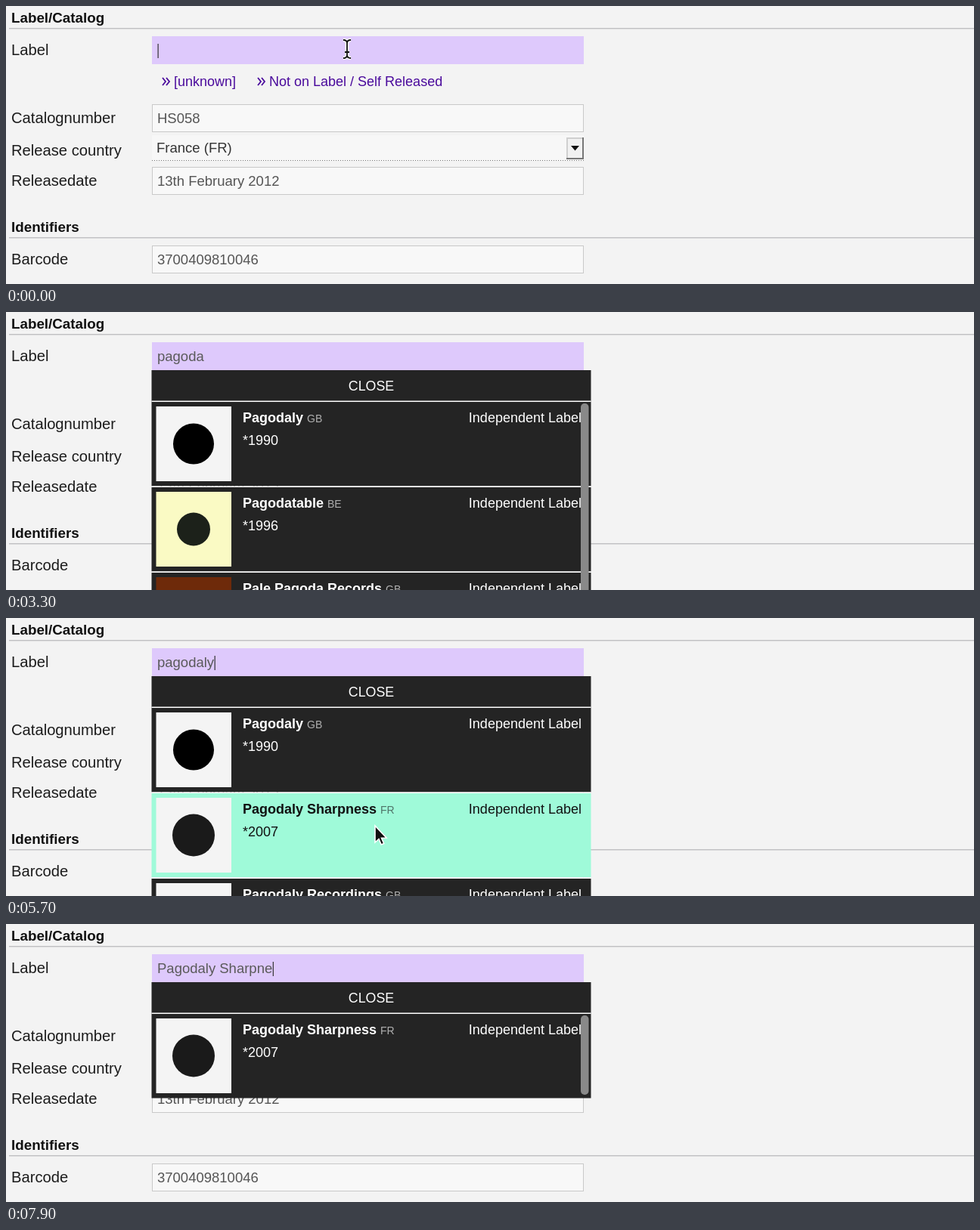
An HTML page with a canvas for the animation above (8000 ms loop, 1280x368 px).

```html
<!DOCTYPE html>
<html lang="en">
<head>
<meta charset="utf-8">
<title>Label search form</title>
<style>
  html, body { margin: 0; width: 100%; height: 100%; overflow: hidden; background: #f3f3f3; }
  canvas { display: block; }
</style>
</head>
<body>
<canvas id="stage" width="1280" height="368"></canvas>
<script>
const ctx = document.getElementById('stage').getContext('2d');
const LOOP = 8000;
const PURPLE = '#4a0a9c';
const FAMILY = '"Liberation Sans", Arial, sans-serif';
const PANEL = { x: 192.5, y: 77, width: 581, rowTop: 119, rowStep: 113, rowHeight: 111.5 };

const ROWS = {
  damp:   { name: 'Damp Pages', code: 'GB', tile: '#000', mark: '#fff', size: 20 },
  plain:  { name: 'Pagodaly', code: 'GB', year: '*1990', tile: '#f4f4f4', mark: '#000', size: 27 },
  tunic:  { name: 'Page Tunic', code: 'US', tile: '#000' },
  table:  { name: 'Pagodatable', code: 'BE', year: '*1996', tile: '#fafac4', mark: '#1c211a', size: 22 },
  pale:   { name: 'Pale Pagoda Records', code: 'GB', tile: '#6e2a0a' },
  sharp:  { name: 'Pagodaly Sharpness', code: 'FR', year: '*2007', tile: '#f4f4f4', mark: '#1a1a1a', size: 28 },
  record: { name: 'Pagodaly Recordings', code: 'GB', tile: '#f4f4f4' }
};

// Each list holds [start time, value]; the latest started entry applies.
const TYPED = [
  [0, ''], [800, 'p'], [1000, 'pa'], [1300, 'pag'], [1900, 'pago'], [2200, 'pagod'],
  [2700, 'pagoda'], [3500, 'pagodal'], [3650, 'pagodaly'], [5850, 'Pagodaly Sharpness'],
  [7300, 'Pagodaly Sharpnes'], [7500, 'Pagodaly Sharpne']
];
const FOCUS = [[0, true], [5850, false], [6800, true]];
const RESULTS = [
  [0, null],
  [1600, ['damp', 'plain', 'tunic']],
  [3000, ['plain', 'table', 'pale']],
  [4100, ['plain', 'sharp', 'record']],
  [5850, null],
  [7700, ['sharp']]
];
const SCROLLBAR_TIME = 700;
const POINTER = [
  [0, 451, 57], [4500, 451, 57], [4900, 460, 150], [5200, 480, 224], [5500, 488, 275],
  [5850, 488, 275], [6300, 440, 106], [6600, 425, 60], [8000, 425, 60]
];
const pointerHidden = t => (t >= 700 && t < 4500) || t >= 7250;

const current = (list, t) => list.filter(entry => entry[0] <= t).pop();

function pointerAt(t) {
  const i = POINTER.findIndex(p => p[0] > t);
  const [t0, x0, y0] = POINTER[i - 1];
  const [t1, x1, y1] = POINTER[i];
  const u = (t - t0) / (t1 - t0);
  return { x: x0 + (x1 - x0) * u, y: y0 + (y1 - y0) * u };
}

function rect(x, y, w, h, color) {
  ctx.fillStyle = color;
  ctx.fillRect(x, y, w, h);
}

function text(str, x, y, size, color, weight = 'normal', align = 'left') {
  ctx.font = `${weight} ${size}px ${FAMILY}`;
  ctx.fillStyle = color;
  ctx.textAlign = align;
  ctx.fillText(str, x, y);
  return ctx.measureText(str).width;
}

function polyline(points, close) {
  ctx.beginPath();
  points.forEach(([x, y]) => ctx.lineTo(x, y));
  if (close) ctx.closePath();
}

function heading(str, y) {
  text(str, 7, y, 18.8, '#111', 'bold');
  rect(4, y + 7.2, 1276, 1.2, '#b6b6b9');
}

function inputBox(y, h) {
  rect(193, y, 571, h, '#f8f8f8');
  ctx.strokeStyle = '#c9c9c9';
  ctx.lineWidth = 1;
  ctx.strokeRect(193.5, y + 0.5, 570, h - 1);
}

function link(str, x) {
  ctx.strokeStyle = PURPLE;
  ctx.lineWidth = 1.8;
  for (const dx of [1, 6]) {
    polyline([[x + dx, 95], [x + dx + 4, 100], [x + dx, 105]]);
    ctx.stroke();
  }
  text(str, x + 16, 106, 18, PURPLE);
}

function countrySelect() {
  rect(193, 171, 571, 33, '#f7f7f7');
  text('France (FR)', 199, 193.5, 18.5, '#333');
  ctx.strokeStyle = '#777';
  ctx.lineWidth = 1;
  ctx.setLineDash([1, 2]);
  polyline([[193, 204.5], [764, 204.5]]);
  ctx.stroke();
  ctx.setLineDash([]);
  rect(741, 174, 23, 29, '#777');
  rect(741, 174, 21, 27, '#cfcfcf');
  rect(743, 176, 19, 25, '#f1f1f1');
  polyline([[747, 185], [758, 185], [752.5, 191.5]], true);
  ctx.fillStyle = '#111';
  ctx.fill();
}

function labelField(t) {
  const [typedAt, value] = current(TYPED, t);
  const [focusAt, focused] = current(FOCUS, t);
  if (focused) rect(193, 40, 571, 37, '#dec9fc');
  else inputBox(40, 37);
  const width = text(value, 200, 65, 18.5, '#5a5a5a');
  const sinceEdit = t - Math.max(typedAt, focusAt);
  if (focused && sinceEdit % 1000 < 500) rect(200.5 + width, 50, 1.2, 19, '#333');
}

function form(t) {
  rect(0, 0, 1280, 368, '#f3f3f3');
  heading('Label/Catalog', 22);
  heading('Identifiers', 299);
  [['Label', 65], ['Catalognumber', 155], ['Release country', 198],
   ['Releasedate', 238], ['Barcode', 342]].forEach(([str, y]) => text(str, 7, y, 20.2, '#1c1c1c'));
  labelField(t);
  link('[unknown]', 206);
  link('Not on Label / Self Released', 332);
  [['HS058', 130], ['13th February 2012', 213], ['3700409810046', 317]].forEach(([str, y]) => {
    inputBox(y, 37);
    text(str, 200, y + 25, 18.5, '#555');
  });
  countrySelect();
}

function resultRow(row, y, hovered) {
  const ink = hovered ? '#111' : '#fff';
  rect(PANEL.x, y - 1.5, PANEL.width, 1.5, '#fff');
  rect(PANEL.x, y, PANEL.width, PANEL.rowHeight, hovered ? '#9ffad9' : '#242424');
  rect(198.5, y + 6, 99.5, 99, row.tile);
  if (row.mark) {
    ctx.beginPath();
    ctx.arc(248, y + 55.5, row.size, 0, Math.PI * 2);
    ctx.fillStyle = row.mark;
    ctx.fill();
  }
  const width = text(row.name, 313, y + 27, 18, ink, 'bold');
  text(row.code, 313 + width + 5, y + 27, 14, hovered ? '#4f7568' : '#b0b0b0');
  text('Independent Label', 761, y + 27, 18, ink, 'normal', 'right');
  if (row.year) text(row.year, 313, y + 56.5, 18, ink);
}

function dropdown(t, pointer) {
  const [shownAt, keys] = current(RESULTS, t);
  if (!keys) return;
  rect(PANEL.x, PANEL.y, PANEL.width, PANEL.rowTop - PANEL.y, '#242424');
  text('CLOSE', 483, 104, 17.8, '#fff', 'normal', 'center');
  keys.forEach((key, i) => {
    const y = PANEL.rowTop + i * PANEL.rowStep;
    const hovered = pointer && pointer.y >= y && pointer.y < y + PANEL.rowHeight;
    resultRow(ROWS[key], y, hovered);
  });
  if (t - shownAt < SCROLLBAR_TIME) {
    ctx.beginPath();
    ctx.roundRect(760, 121, 10.5, keys.length > 1 ? 300 : 105, 5);
    ctx.fillStyle = '#898989';
    ctx.fill();
  }
}

function textCursor() {
  ctx.beginPath();
  for (const s of [-1, 1]) {
    ctx.moveTo(-5, s * 12);
    ctx.quadraticCurveTo(0, s * 12, 0, s * 8);
    ctx.quadraticCurveTo(0, s * 12, 5, s * 12);
  }
  ctx.moveTo(0, -9);
  ctx.lineTo(0, 9);
  ctx.moveTo(-3, 4);
  ctx.lineTo(3, 4);
  for (const [color, width] of [['#fff', 4.5], ['#111', 1.8]]) {
    ctx.strokeStyle = color;
    ctx.lineWidth = width;
    ctx.stroke();
  }
}

function arrowCursor() {
  polyline([[0, 0], [0, 22], [5, 17.5], [8.2, 25], [11.7, 23.5], [8.5, 16.3], [15, 16]], true);
  ctx.fillStyle = '#111';
  ctx.fill();
  ctx.strokeStyle = '#fff';
  ctx.lineWidth = 1.6;
  ctx.stroke();
}

function draw(t) {
  const pointer = pointerHidden(t) ? null : pointerAt(t);
  form(t);
  dropdown(t, pointer);
  if (!pointer) return;
  ctx.save();
  ctx.translate(pointer.x, pointer.y);
  if (pointer.y >= 40 && pointer.y < 77) textCursor();
  else arrowCursor();
  ctx.restore();
}

function tick() {
  draw(Math.floor(performance.now() % LOOP / 100) * 100);
  requestAnimationFrame(tick);
}
tick();
</script>
</body>
</html>
```
